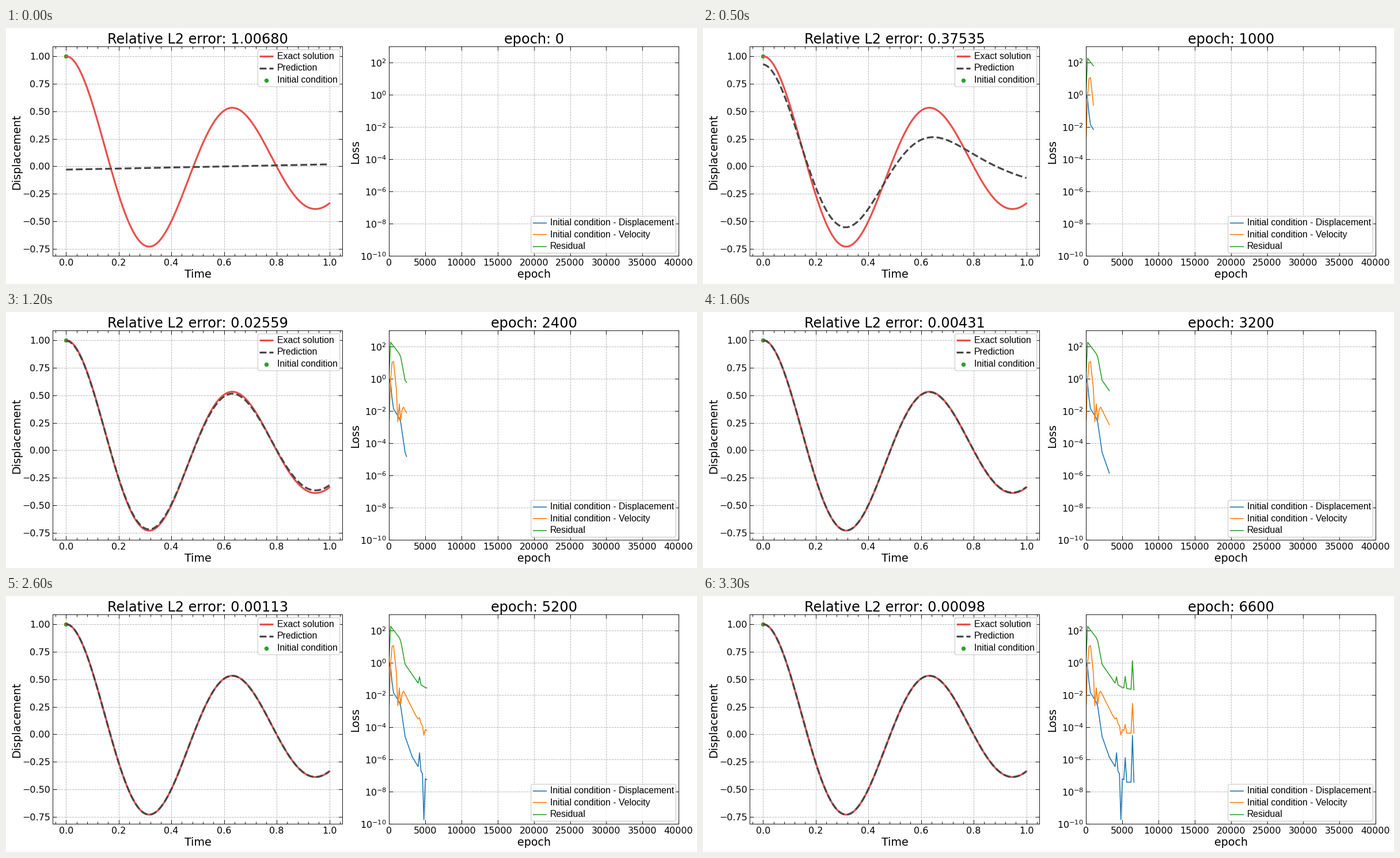
Recreate the animation shown at these times as a matplotlib script. Size 1200 by 445 pixels, loop 3400 ms.

```python
import matplotlib.pyplot as plt
import numpy as np
from matplotlib.animation import FuncAnimation
from matplotlib.patches import FancyBboxPatch
from matplotlib.ticker import MultipleLocator, NullLocator

W, H, DPI = 1200, 445, 100
PX = 72 / DPI  # points per pixel
FRAMES, INTERVAL, EPOCH_STEP = 34, 100, 200
RED, GREY = "#e9504c", "#474747"
BLUE, ORANGE, GREEN = "#1f77b4", "#ff7f0e", "#2ca02c"
THIN, THICK, LOSS = .9 * PX, 3.2 * PX, 1.6 * PX

plt.rcParams.update({"font.family": "DejaVu Sans", "axes.linewidth": THIN})

epochs = np.arange(FRAMES) * EPOCH_STEP
SPIKES = {4200: 1, 5400: 1.45, 6400: 2.9}  # training hiccups shared by all curves


def history(knots, gain, power=1):
    """Values per frame from (epoch, log10 value) knots plus scaled spikes."""
    x, y = zip(*knots)
    logs = np.interp(epochs, x, y)
    for epoch, height in SPIKES.items():
        logs[epoch // EPOCH_STEP] += gain * height ** power
    return 10 ** logs


displacement = history([(0, 0), (200, -.3), (400, -1.2), (600, -1.85), (1400, -2.43),
                        (1600, -2.7), (2200, -4.56), (3200, -5.84), (4600, -6.87),
                        (4800, -9.73), (5000, -7.18), (5600, -7.4)], 1)
velocity = history([(0, -2.62), (200, 0), (400, 1.02), (600, 1.08), (1000, -.63),
                    (1200, -2.66), (1400, -1.55), (1600, -2.57), (1800, -1.88),
                    (2000, -1.75), (3600, -3.2), (4600, -3.9), (4800, -4.48),
                    (5000, -4.13), (5600, -4.36)], .22, 2)
residual = history([(0, .4), (200, 2.28), (1400, 1.57), (1600, 1.36), (2200, -.08),
                    (4000, -1.25), (5000, -1.53), (6600, -1.67)], .45, 1.3)
error = history([(epoch, np.log10(value)) for epoch, value in (
    (1000, .37535), (1400, .3), (1800, .09736), (3200, .00431),
    (4400, .00126), (5200, .00113), (6600, .00098))], .45)

# Damped oscillator with unit start, damping 1 and natural frequency 10
OMEGA = np.sqrt(99)
t = np.linspace(0, 1, 500)
exact = np.exp(-t) * (np.cos(OMEGA * t) + np.sin(OMEGA * t) / OMEGA)


def relative(diff):
    return np.linalg.norm(diff) / np.linalg.norm(exact)


def late_gap(epoch):
    """Unit-size difference to the exact curve: an oscillation growing in time."""
    mix = np.clip((epoch - 1000) / 800, 0, 1)
    first = .075 + .3 * t + .13 * t ** 2 - .16 * t ** 3
    last = .08 + .29 * t
    envelope = first + (last - first) * mix
    gap = envelope * np.cos((10.22 - .12 * mix) * t + .04 * (1 - mix))
    return gap / relative(gap)


def predict(i):
    """Predicted curve and its relative error."""
    if i == 0:
        return -.03 + .048 * t, 1.0068
    if epochs[i] < 1000:
        # overdamped early fit whose start and slope follow the losses
        start, slope = 1 - displacement[i] ** .5, -velocity[i] ** .5
        decay = 6.8 - i
        sine = (slope / start + decay) / OMEGA
        curve = start * np.exp(-decay * t) * (
            np.cos(OMEGA * t) + sine * np.sin(OMEGA * t))
        return curve, relative(exact - curve)
    return exact - error[i] * late_gap(epochs[i]), error[i]


fig = plt.figure(figsize=(W / DPI, H / DPI), dpi=DPI, facecolor="white")


def make_axes(left, right, top=32.4, bottom=396.4):
    ax = fig.add_axes([left / W, 1 - bottom / H, (right - left) / W, (bottom - top) / H])
    ax.grid(True, color="#b4b4b4", ls="--", lw=THIN)
    ax.set_axisbelow(True)
    ax.tick_params(which="both", direction="in", top=True, right=True,
                   width=THIN, labelsize=16 * PX, pad=4.5 * PX)
    ax.tick_params(which="major", length=7 * PX)
    ax.tick_params(which="minor", length=4 * PX)
    return ax


left = make_axes(81.4, 584.4)
left.set(xlim=(-.05, 1.05), ylim=(-.8146, 1.0864))
left.xaxis.set_major_locator(MultipleLocator(.2))
left.xaxis.set_minor_locator(MultipleLocator(.04))
left.yaxis.set_major_locator(MultipleLocator(.25))
left.plot([0], [1], "o", color=GREEN, ms=7.5 * PX, mew=0, zorder=1.5)
left.plot(t, exact, color=RED, lw=THICK)
prediction, = left.plot([], [], "--", color=GREY, lw=THICK)

right = make_axes(665.4, 1168)
right.set_yscale("log")
right.set(xlim=(0, 40000), ylim=(1e-10, 1e3))
right.set_yticks([10.0 ** k for k in range(-10, 3, 2)])
right.yaxis.set_minor_locator(NullLocator())
losses = [(right.plot([], [], color=color, lw=LOSS)[0], values)
          for color, values in ((BLUE, displacement), (ORANGE, velocity),
                                (GREEN, residual))]

# Labels and legends are laid out in stage pixels
page = fig.add_axes([0, 0, 1, 1])
page.set(xlim=(0, W), ylim=(H, 0))
page.axis("off")


def label(x, y, text, size, **kw):
    kw = {"ha": "center", "va": "baseline", **kw}
    return page.text(x, y, text, fontsize=size * PX, **kw)


def legend(x0, y0, x1, y1, rows):
    r = 3
    page.add_patch(FancyBboxPatch(
        (x0 + r, y0 + r), x1 - x0 - 2 * r, y1 - y0 - 2 * r,
        boxstyle=f"round,pad={r},rounding_size={r}",
        fc=(1, 1, 1, .8), ec="#cccccc", lw=1.2 * PX))
    for i, (text, color, style, width) in enumerate(rows):
        y = y0 + 11.6 + 20.4 * i
        if style == "o":
            page.plot([x0 + 14.9], [y + 1.2], "o", color=color, ms=7.5 * PX, mew=0)
        else:
            page.plot([x0 + 3, x0 + 27], [y, y], style, color=color,
                      lw=width, solid_capstyle="butt")
        label(x0 + 33.2, y + 4.5, text, 15.9, ha="left", family="Liberation Sans")


legend(437.4, 37.8, 579.6, 102, [
    ("Exact solution", RED, "-", THICK),
    ("Prediction", GREY, "--", THICK),
    ("Initial condition", GREEN, "o", 0)])
legend(911.8, 327.2, 1163.2, 391.4, [
    ("Initial condition - Displacement", BLUE, "-", LOSS),
    ("Initial condition - Velocity", ORANGE, "-", LOSS),
    ("Residual", GREEN, "-", LOSS)])

label(333, 434, "Time", 19.2)
label(916.7, 434, "epoch", 19.2)
for x, y, name in ((24.2, 215.6, "Displacement"), (612.6, 214.6, "Loss")):
    label(x, y, name, 19.2, rotation=90, rotation_mode="anchor")
error_title = label(333, 26.6, "", 24)
epoch_title = label(916.7, 26.6, "", 24)


def draw(i):
    curve, rel_error = predict(i)
    prediction.set_data(t, curve)
    for line, values in losses:
        line.set_data(epochs[:i + 1], values[:i + 1])
    error_title.set_text(f"Relative L2 error: {rel_error:.5f}")
    epoch_title.set_text(f"epoch: {epochs[i]}")
    return [prediction, error_title, epoch_title, *(line for line, _ in losses)]


anim = FuncAnimation(fig, draw, frames=FRAMES, interval=INTERVAL,
                     repeat=True, repeat_delay=0, blit=False)
plt.show()
```
